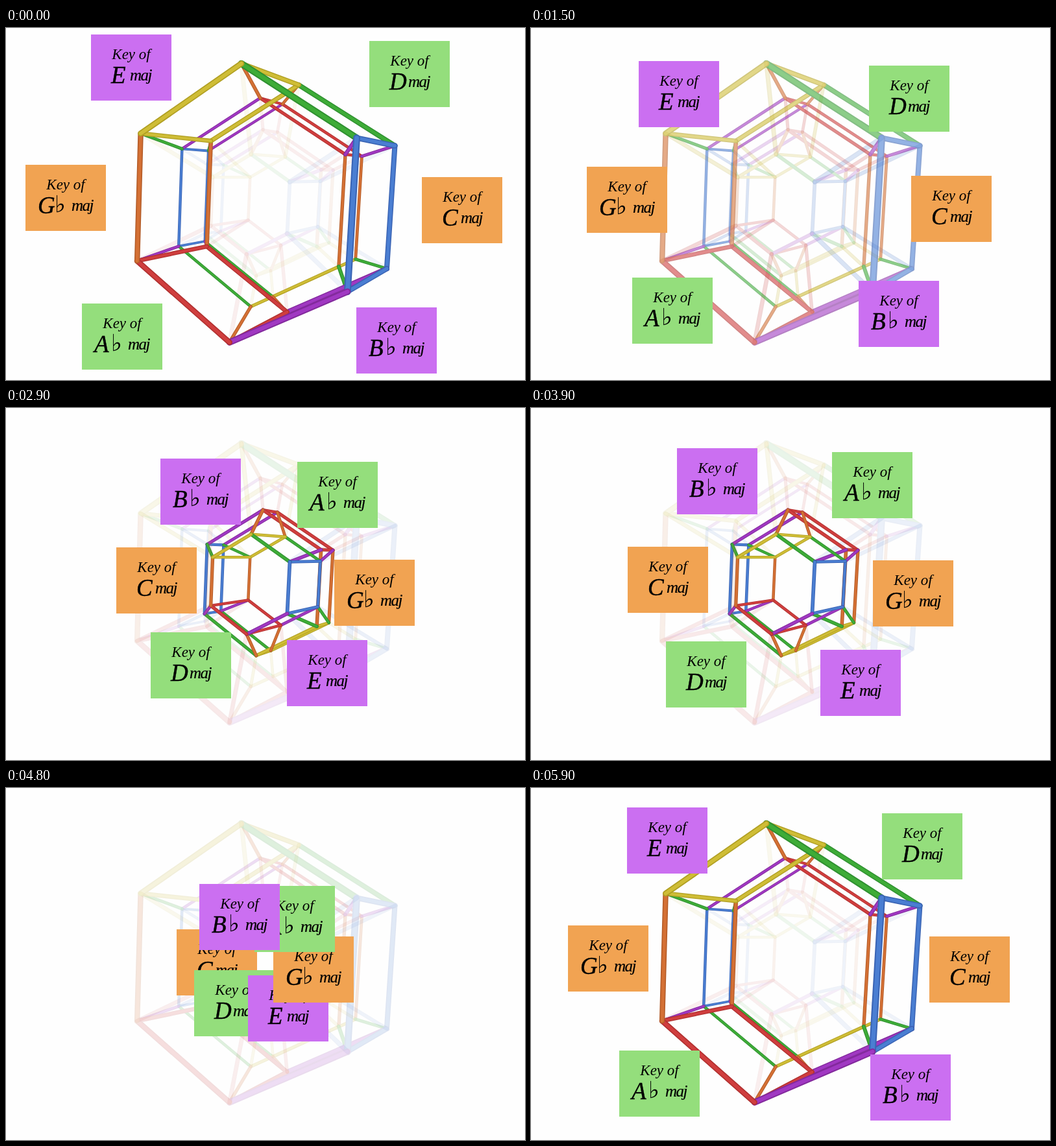
Write an HTML page that moves like this. It is 800x543 px and loops after 6 s.

```html
<!DOCTYPE html>
<html lang="en">
<head>
<meta charset="utf-8">
<title>Keys around a lattice</title>
<style>
  html, body { margin: 0; width: 100%; height: 100%; overflow: hidden; background: #fefefe; }
  svg { display: block; width: 100vw; height: 100vh; }
  text { font-family: "Liberation Serif", "Times New Roman", serif; font-style: italic; fill: #000; }
  .small { font-size: 23px; }
  .big { font-size: 37px; stroke: #000; stroke-width: .4px; }
  .maj { font-size: 25px; letter-spacing: -1.5px; stroke: #000; stroke-width: .2px; }
  .flat { font: 36px "DejaVu Sans", sans-serif; }
</style>
</head>
<body>
<svg id="stage" viewBox="0 0 800 543"></svg>
<script>
const LOOP = 6000, STEP = 100;
const stage = document.getElementById('stage');

function add(parent, tag, attrs, text) {
  const el = document.createElementNS('http://www.w3.org/2000/svg', tag);
  for (const k in attrs) el.setAttribute(k, attrs[k]);
  if (text) el.textContent = text;
  parent.appendChild(el);
  return el;
}

// dark edge and body colour of each tube
const TUBE = {
  g: ['#2f9030', '#3eac37'], b: ['#3a64b4', '#4a7ed2'], p: ['#82299c', '#a038c2'],
  r: ['#b0302f', '#d03e3e'], o: ['#b45c28', '#d47034'], y: ['#b09f22', '#cfbd36']
};
// edge colours per corner, clockwise from the top
const RING = 'gbproy', XX = 'ybbrry', YY = 'rryybb', XY = 'opgopg';

// Ring sections: radius and inset from the front and back planes.
const outer = { x: { r: 1, inset: 0, w: 9.5 }, y: { r: .8, inset: .305, w: 5.3 } };
const inner = { x: { r: .375, inset: .2, w: 5.8 }, y: { r: .567, inset: .373, w: 5.8 } };

// Perspective view of corner i of a hexagon, on its front (0) or back (1) plane.
function corner(ring, i, back) {
  const a = i * Math.PI / 3;
  const u = ring.r * Math.sin(a) / Math.sin(Math.PI / 3), v = -ring.r * Math.cos(a);
  const z = back ? 1 - ring.inset : ring.inset;
  const depth = 1 - .095 * u + .021 * v + .228 * z;
  return {
    x: (353.5 + 129.2 * u - 1.7 * v + 189.3 * z) / depth,
    y: (274.4 - 12.4 * u + 220.7 * v + 52.2 * z) / depth,
    depth
  };
}

const layer = () => add(stage, 'g', { 'stroke-linecap': 'round' });
const each = fn => { for (let i = 0; i < 6; i++) fn(i); };

function tube(g, a, b, key, size) {
  const d = `M${a.x} ${a.y}L${b.x} ${b.y}`;
  const w = size / ((a.depth + b.depth) / 2) ** 1.3;
  add(g, 'path', { d, stroke: TUBE[key][0], 'stroke-width': w });
  add(g, 'path', { d, stroke: TUBE[key][1], 'stroke-width': w * .62 });
}

function drawLattice({ x, y }) {
  const g = layer();
  const hexagon = (ring, back, shift) => each(i =>
    tube(g, corner(ring, i, back), corner(ring, i + 1, back), RING[(i + shift) % 6], ring.w));
  const bars = (ring, colors) => each(i =>
    tube(g, corner(ring, i, 0), corner(ring, i, 1), colors[i], ring.w * .9));

  hexagon(y, 1, 3);
  bars(y, YY);
  hexagon(y, 0, 3);
  for (const back of [1, 0])
    each(i => tube(g, corner(x, i, back), corner(y, i, back), XY[i], 5.6));
  hexagon(x, 1, 0);
  bars(x, XX);
  hexagon(x, 0, 0);
  return g;
}

function drawSpokes() {
  const g = layer();
  for (const back of [1, 0]) each(i => {
    tube(g, corner(outer.x, i, back), corner(inner.x, i, back), XX[i], 7);
    tube(g, corner(outer.y, i, back), corner(inner.y, i, back), YY[i], 5.5);
  });
  return g;
}

const spokesEl = drawSpokes();
const innerEl = drawLattice(inner);
const outerEl = drawLattice(outer);

const VIOLET = '#cb6ff1', GREEN = '#94de7c', ORANGE = '#f1a352';
// name, colour, start, far end; listed from back to front
const cards = [
  ['C', ORANGE, [641, 230], [149, 214]],
  ['D', GREEN, [560, 20], [208, 360]],
  ['E', VIOLET, [131, 10], [446, 373]],
  ['G♭', ORANGE, [30, 211], [527, 235]],
  ['A♭', GREEN, [117, 425], [464, 68]],
  ['B♭', VIOLET, [540, 431], [225, 62]]
].map(([name, fill, from, to]) => {
  const el = add(stage, 'g', {});
  const flat = name.length > 1;
  add(el, 'rect', { width: 124, height: 102, fill });
  add(el, 'text', { class: 'small', x: 62, y: 38, 'text-anchor': 'middle' }, 'Key of');
  add(el, 'text', { class: 'big', x: flat ? 19 : 31, y: 75 }, name[0]);
  if (flat) add(el, 'text', { class: 'flat', x: 45, y: 73 }, '♭');
  add(el, 'text', { class: 'maj', x: flat ? 71 : 60, y: 71 }, 'maj');
  return { el, from, to };
});

const ramp = (t, a, b) => Math.min(1, Math.max(0, (t - a) / (b - a)));
const glide = (t, start) => ramp(t, start, start + 1937) ** 1.58;

function render(ms) {
  const t = Math.floor((ms + 5) / STEP) * STEP % LOOP;
  const p = glide(t, 1015) - glide(t, 4031);
  const out = 1 - .9 * (ramp(t, 950, 2150) - ramp(t, 4730, 5800));
  const glow = ramp(t, 1000, 1500) - ramp(t, 1500, 2100);
  const inn = .08 + .12 * glow + .92 * (ramp(t, 2100, 2800) - ramp(t, 4000, 4700));
  outerEl.setAttribute('opacity', out);
  innerEl.setAttribute('opacity', inn);
  spokesEl.setAttribute('opacity', Math.min(out, inn));
  for (const { el, from, to } of cards) {
    const [x, y] = from.map((v, i) => Math.round(v + (to[i] - v) * p));
    el.setAttribute('transform', `translate(${x} ${y})`);
  }
}

const begin = performance.now();
function tick(now) {
  render(Math.max(0, now - begin));
  requestAnimationFrame(tick);
}
render(0);
requestAnimationFrame(tick);
</script>
</body>
</html>
```
